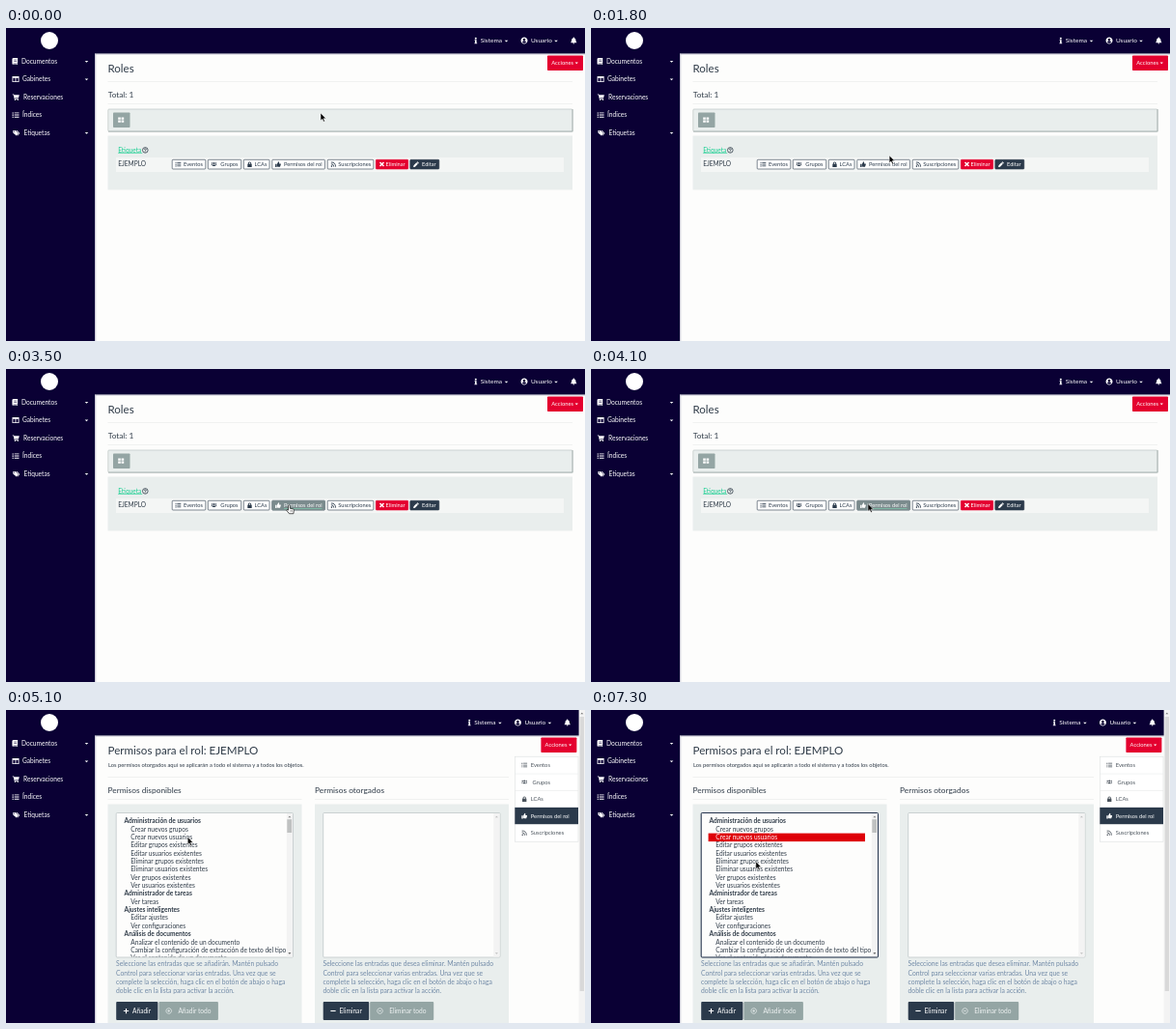
An HTML page for the animation above (8000 ms loop, 600x324 px).

```html
<!DOCTYPE html>
<html lang="es">
<head>
<meta charset="utf-8">
<title>Roles</title>
<style>
html, body { margin: 0; width: 100%; height: 100%; overflow: hidden; background: #fdfdfc; }
svg { display: block; width: 100vw; height: 100vh; font-family: Lato, sans-serif; }
text { white-space: pre; }
</style>
</head>
<body>
<svg id="stage" viewBox="0 0 600 324"></svg>
<script>
const LOOP = 8000;
const NAVY = '#0a0034', RED = '#e4002f', DARK = '#2b3a4b', GREY = '#94a5a4', PANEL = '#e9eeed', INK = '#2f3b48';

// Icons are drawn in a 16-unit box
const ICONS = {
  book: '<path d="M4 0h10v12h-1v3h1v1H4a3 3 0 0 1-3-3V3a3 3 0 0 1 3-3zm0 13a1 1 0 0 0 0 2h8v-2zM5 4v1h7V4zm0 3v1h7V7z" fill-rule="evenodd"/>',
  columns: '<path d="M0 1h16v14H0zm2 4v8h5V5zm7 0v8h5V5z" fill-rule="evenodd"/>',
  cart: '<path d="M0 1h3l.6 2H16l-2 7H5.5l.3 1.5H14V13H4.5L2 2.700H0z"/><circle cx="6" cy="14.500" r="1.500"/><circle cx="12.500" cy="14.500" r="1.500"/>',
  list: '<path d="M0 2h3v2.500H0zm5 0h11v2.200H5zM0 7h3v2.500H0zm5 0h11v2.200H5zM0 12h3v2.500H0zm5 0h11v2.200H5z"/>',
  tags: '<path d="M0 2h6l7 7-5 6-8-7zm3 1.500a1.200 1.200 0 1 0 .1 0zM8 2h2l6 7-5 6-1-1 4-5z" fill-rule="evenodd"/>',
  info: '<circle cx="8" cy="2.500" r="2.500"/><path d="M5 6h5v8h1.500v2h-7v-2H6V8H5z"/>',
  user: '<path d="M8 0a8 8 0 1 0 .1 0zM8 3a3 3 0 1 1-.1 0zM3 12q1.500-3 5-3t5 3q-2 2.500-5 2.500T3 12z" fill-rule="evenodd"/>',
  bell: '<path d="M7 0h2v1.500q4 .5 4 5 0 4 2 5.500v1H1v-1q2-1.500 2-5.500 0-4.500 4-5zM6 14h4q-.5 2-2 2t-2-2z"/>',
  users: '<circle cx="8" cy="5" r="2.700"/><path d="M3.500 13q0-4.500 4.500-4.500t4.500 4.500z"/><circle cx="2.500" cy="5" r="1.900"/><circle cx="13.500" cy="5" r="1.900"/><path d="M0 11q0-3.500 3.500-3L2.700 11zm16 0q0-3.500-3.500-3l.8 3z"/>',
  lock: '<path d="M2 7h1.500V5a4.500 4.500 0 0 1 9 0v2H14v9H2zm4 0h4V5a2 2 0 0 0-4 0z" fill-rule="evenodd"/>',
  thumb: '<path d="M0 7h4v9H0zm5 0 4-7q3 0 2 6h4.500q1 1-.2 3.500L13.500 15H7l-2-1z"/>',
  rss: '<circle cx="2.500" cy="13.500" r="2.200"/><path d="M1 7q8 0 8 8M1 2q13 0 13 13" fill="none" stroke="currentColor" stroke-width="2.400"/>',
  times: '<path d="M2.500 2.500 13.500 13.500M13.500 2.500 2.500 13.500" fill="none" stroke="currentColor" stroke-width="4"/>',
  pen: '<path d="M0 16l1-5L9 3l4 4-8 8zM10 2l2-2 4 4-2 2z"/>',
  grid: '<path d="M0 1h7v6H0zm9 0h7v6H9zM0 9h7v6H0zm9 0h7v6H9z"/>',
  plus: '<path d="M6.500 1h3v5.500H15v3H9.500V15h-3V9.500H1v-3h5.500z"/>',
  minus: '<path d="M1 6.500h14v3H1z"/>',
  ask: '<circle cx="8" cy="8" r="7" fill="none" stroke="currentColor" stroke-width="2"/><path d="M5.500 6.500q0-2.500 2.500-2.500t2.500 2.200Q10.500 8 8 8.300V10M8 11v2" fill="none" stroke="currentColor" stroke-width="1.800"/>',
  ringPlus: '<path d="M8 1a7 7 0 1 0 .1 0M8 4.500v7M4.500 8h7" fill="none" stroke="currentColor" stroke-width="1.700"/>',
  ringMinus: '<path d="M8 1a7 7 0 1 0 .1 0M4.500 8h7" fill="none" stroke="currentColor" stroke-width="1.700"/>'
};

const rect = (x, y, w, h, fill, more = '') =>
  `<rect x="${x}" y="${y}" width="${w}" height="${h}" fill="${fill}" ${more}/>`;
const text = (x, y, s, size = 6.6, fill = INK, more = '') =>
  `<text x="${x}" y="${y}" font-size="${size}" fill="${fill}" ${more}>${s}</text>`;
// x and y give the centre of the icon
const icon = (name, x, y, size, color) =>
  `<g transform="translate(${x - size / 2} ${y - size / 2}) scale(${size / 16})" fill="${color}" color="${color}">${ICONS[name]}</g>`;
const caret = (x, y, color = '#fff', r = 1.8) =>
  `<path d="M${x - r} ${y - r / 2}h${2 * r}l${-r} ${r}z" fill="${color}"/>`;
const rule = (x, y, w) => rect(x, y, w, 0.6, '#e8eaea');
const group = (id, body) => `<g id="${id}">${body}</g>`;

function chrome() {
  const items = [
    ['book', 'Documentos', 9.5, 16, 1], ['columns', 'Gabinetes', 10, 17, 1],
    ['cart', 'Reservaciones', 10.3, 18, 0], ['list', 'Índices', 10, 17, 0], ['tags', 'Etiquetas', 10.8, 18.5, 1]
  ];
  return rect(92, 26, 508, 1.4, '#b9b8c6') + rect(92, 26, 1.2, 298, '#c9c8d4') +
    rect(0, 0, 600, 26.3, NAVY) + rect(0, 0, 92, 324, NAVY) +
    '<circle cx="45" cy="13" r="9" fill="#fff"/>' +
    items.map(([ic, label, ix, tx, more], i) => {
      const y = 34.5 + i * 18.5;
      return icon(ic, ix, y, 7, '#fff') + text(tx, y + 2.2, label, 6.6, '#fff') + (more ? caret(83.5, y + 0.3) : '');
    }).join('');
}

// Top menu and action button; dx follows the page width
const topBar = dx => `<g transform="translate(${dx} 0)">` +
  icon('info', 486.8, 13, 6.5, '#fff') + text(491.8, 15.3, 'Sistema', 6.5, '#fff') + caret(518.5, 13.6) +
  icon('user', 537, 13, 7, '#fff') + text(544, 15.3, 'Usuario', 6.5, '#fff') + caret(570, 13.6) +
  icon('bell', 588.3, 13, 6.8, '#fff') +
  rect(561, 28.5, 37, 15.5, RED, 'rx=".8"') + text(565.2, 38, 'Acciones', 5.8, '#fff') + caret(591.3, 36.4, '#fff', 1.6) + '</g>';

function rowButton(x, w, ic, label, tx, fill, color) {
  return rect(x, 136.3, w, 9.7, fill, `rx=".8" stroke="${fill === '#fff' ? DARK : fill}" stroke-width=".6"`) +
    icon(ic, x + 6.2, 141.1, 5.8, color) + text(tx, 143.1, label, 5.7, color);
}

function rolesPage() {
  return topBar(0) +
    text(105.5, 45.7, 'Roles', 11.5) + rule(105.5, 55, 481.5) +
    text(105.8, 71.6, 'Total: 1', 8.25) + rule(105.5, 78, 481.5) +
    rect(105.8, 84, 481.2, 23, PANEL, 'rx="1" stroke="#b4bebd" stroke-width=".6"') +
    rect(106, 106.7, 481.4, 0.8, '#9fabaa') + rect(586.7, 84, 0.8, 23, '#9fabaa') +
    rect(111, 87.5, 17.5, 15.5, GREY, 'rx=".8"') + icon('grid', 119.2, 95, 6, '#fff') +
    rect(105.5, 111.5, 481.5, 56, PANEL) + rect(114, 134, 464, 15, '#f4f6f5') +
    text(116.2, 128.7, 'Etiqueta', 6.6, '#18cf91') + rect(116.2, 129.3, 25, 0.6, '#18cf91') +
    icon('ask', 144.3, 126.4, 6.4, INK) + text(116.2, 142.8, 'EJEMPLO') +
    rowButton(172.2, 34.6, 'list', 'Eventos', 184, '#fff', DARK) +
    rowButton(209.3, 34.4, 'users', 'Grupos', 222.3, '#fff', DARK) +
    rowButton(246.3, 26.7, 'lock', 'LCAs', 257.6, '#fff', DARK) +
    rowButton(275.8, 54.6, 'thumb', 'Permisos del rol', 288, '#fff', DARK) +
    rowButton(333.2, 47.6, 'rss', 'Suscripciones', 344.2, '#fff', DARK) +
    rowButton(383.3, 33.4, 'times', 'Eliminar', 393.6, RED, '#fff') +
    rowButton(418.8, 30, 'pen', 'Editar', 431, DARK, '#fff') +
    group('hover', rowButton(275.8, 54.6, 'thumb', 'Permisos del rol', 288, '#7b8b8d', '#fff') +
      rect(288, 144.2, 39.5, 0.5, '#7fe0b8'));
}

// Headings start with #
const ENTRIES = ['#Administración de usuarios', 'Crear nuevos grupos', 'Crear nuevos usuarios',
  'Editar grupos existentes', 'Editar usuarios existentes', 'Eliminar grupos existentes',
  'Eliminar usuarios existentes', 'Ver grupos existentes', 'Ver usuarios existentes',
  '#Administrador de tareas', 'Ver tareas', '#Ajustes inteligentes', 'Editar ajustes',
  'Ver configuraciones', '#Análisis de documentos', 'Analizar el contenido de un documento',
  'Cambiar la configuración de extracción de texto del tipo', 'Ver el contenido de un documento'];

function entry(s, i, color) {
  const bold = s[0] === '#';
  return text(bold ? 122.6 : 129.3, 117.4 + i * 8.34, s.replace('#', ''), 6.6, color, bold ? 'font-weight="700"' : '');
}

function column(x, title, verb, first, pairs) {
  const box = x + 8.7;
  const help = [first, 'Control para seleccionar varias entradas. Una vez que se',
    'complete la selección, haga clic en el botón de abajo o haga', 'doble clic en la lista para activar la acción.'];
  const [main, all, w1, w2] = pairs;
  return text(x, 85.7, title, 8.35) + rule(x, 92, 201) + rect(x, 97.5, 201, 227, PANEL) +
    rect(box, 106.5, 183.3, 149.5, '#fdfdfc', 'rx="1" stroke="#b9c2c3" stroke-width=".7"') +
    rect(box + 176.6, 107, 6.2, 148.5, '#f3f3f3') +
    caret(box + 179.7, 110.6, verb === 'Añadir' ? '#777' : '#bbb', -1.5) +
    caret(box + 179.7, 252, verb === 'Añadir' ? '#444' : '#bbb', 1.5) +
    help.map((s, i) => text(box - 0.2, 265.4 + i * 9.15, s, 6.77, '#7089a6')).join('') +
    rect(box, 302, w1, 19, DARK, 'rx="1"') + icon(main, box + 10.3, 311.5, 6, '#fff') + text(box + 16.8, 313.8, verb, 6.6, '#fff') +
    rect(box + w1 + 1, 302, w2, 19, GREY, 'rx="1"') + icon(all, box + w1 + 11.3, 311.5, 6.4, '#eef2f2') +
    text(box + w1 + 21, 313.8, verb + ' todo', 6.6, '#eef2f2');
}

function sideMenu() {
  const rows = [['list', 'Eventos'], ['users', 'Grupos'], ['lock', 'LCAs'], ['thumb', 'Permisos del rol'], ['rss', 'Suscripciones']];
  return rect(527.3, 48.2, 65.7, 88, '#fff', 'stroke="#dcdfe0" stroke-width=".6"') +
    rows.map(([ic, label], i) => {
      const y = 57 + i * 17.55, on = i === 3, c = on ? '#fff' : '#4a535c';
      return (on ? rect(527.3, y - 8.8, 65.7, 17.5, DARK) : i ? rule(527.3, y - 8.8, 65.7) : '') +
        icon(ic, 537.2, y, 5.8, c) + text(i === 1 ? 545.5 : 543.8, y + 2, label, 5.75, c);
    }).join('');
}

function permsPage() {
  return topBar(-6.6) + rect(593.6, 0, 6.4, 324, '#f3f3f3') + rect(594.6, 7, 4.4, 284, '#d9d9d9') +
    caret(596.8, 3.5, '#777', -1.5) +
    text(105.5, 45.7, 'Permisos para el rol: EJEMPLO', 11.6) +
    text(106, 59.4, 'Los permisos otorgados aquí se aplicarán a todo el sistema y a todos los objetos.', 5.8) +
    rule(105.5, 69, 415.5) +
    column(105.5, 'Permisos disponibles', 'Añadir', 'Seleccione las entradas que se añadirán. Mantén pulsado', ['plus', 'ringPlus', 43.2, 61.5]) +
    column(320, 'Permisos otorgados', 'Eliminar', 'Seleccione las entradas que desea eliminar. Mantén pulsado', ['minus', 'ringMinus', 47.5, 66]) +
    rect(291.3, 113.2, 4.8, 13.8, '#bfc1c1') +
    `<g clip-path="url(#clip)">${ENTRIES.map((s, i) => entry(s, i, INK)).join('')}` +
    group('pick', rect(121.6, 127.6, 162.4, 8.5, '#de0008') + entry(ENTRIES[2], 2, '#fff')) + '</g>' +
    group('focus', rect(114.2, 106.5, 183.3, 149.5, 'none', 'rx="1" stroke="#26344f" stroke-width="1"')) +
    sideMenu();
}

const ARROW = '<path d="M0 0v7.800l1.800-1.600 1.300 2.900 1.300-.6-1.300-2.800h2.500z" fill="#000" stroke="#fff" stroke-width=".5"/>';
const HAND = '<path d="M-.8.5q.9-1 1.800 0V3.400l3.400.7q.8.3.7 1.200L4.600 8.900H.2L-2.600 5.400q.2-1.100 1.800-.1z" fill="#fff" stroke="#111" stroke-width=".7"/><path d="M1.700 5v2M3.100 5v2" stroke="#111" stroke-width=".4"/>';

const stage = document.getElementById('stage');
stage.innerHTML = '<defs><clipPath id="clip"><rect x="115" y="107" width="175.500" height="148.500"/></clipPath></defs>' +
  rect(0, 0, 600, 324, '#fdfdfc') + chrome() + group('roles', rolesPage()) + group('perms', permsPage()) +
  group('cursor', group('arrow', ARROW) + group('hand', HAND));

const el = id => document.getElementById(id);
const show = (id, on) => el(id).setAttribute('visibility', on ? 'inherit' : 'hidden');

// Pointer moves: start, end, target x, target y
const HOME = [326, 88];
const MOVES = [[1200, 2000, 306, 140], [2000, 2400, 300.5, 141], [2400, 2800, 294, 141],
  [3400, 3900, 287, 139.5], [4500, 5300, 170, 130], [5900, 6300, 170.8, 156.8]];

function pointer(t) {
  let [x, y] = HOME;
  for (const [a, b, tx, ty] of MOVES) {
    const u = Math.min(1, Math.max(0, (t - a) / (b - a))), e = u * u * (3 - 2 * u);
    x += (tx - x) * e;
    y += (ty - y) * e;
  }
  return [x, y];
}

function draw(ms) {
  const t = Math.floor(ms % LOOP / 100) * 100;
  const [x, y] = pointer(t);
  const second = t >= 4200;
  const hover = !second && y > 136;
  const hand = hover && t < 4100;
  show('roles', !second);
  show('perms', second);
  show('hover', hover);
  show('pick', second && t >= 5700);
  show('focus', second && t >= 5700);
  show('arrow', !hand);
  show('hand', hand);
  el('cursor').setAttribute('transform', `translate(${x.toFixed(2)} ${y.toFixed(2)})`);
}

const begin = performance.now();
function tick() {
  draw(performance.now() - begin);
  requestAnimationFrame(tick);
}
tick();
</script>
</body>
</html>
```
